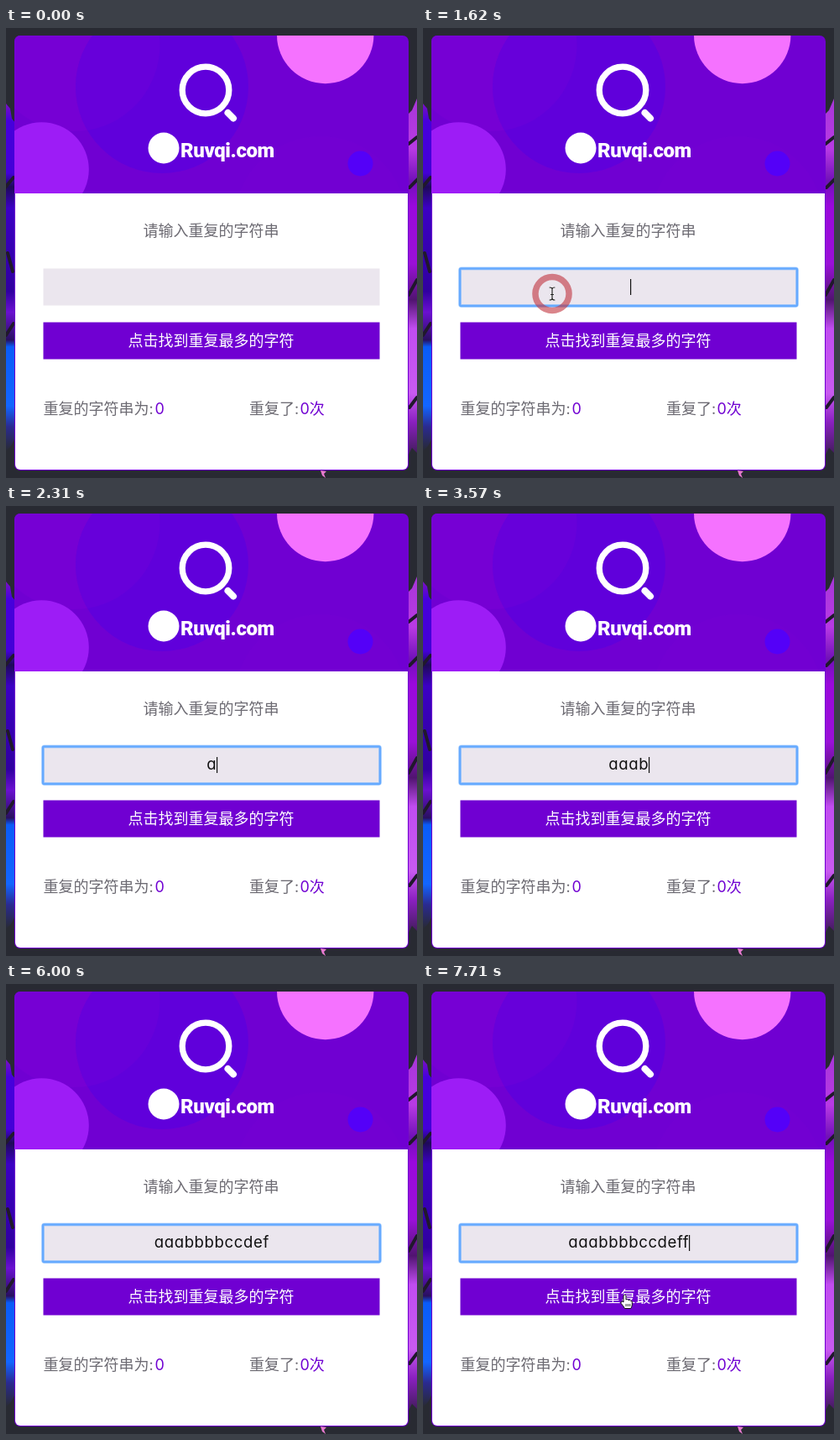
An HTML page for the animation above (8000 ms loop, 490 px wide and 536 px high).

```html
<!DOCTYPE html>
<html lang="zh">
<head>
<meta charset="utf-8">
<title>重复的字符</title>
<style>
html, body { margin: 0; width: 100%; height: 100%; overflow: hidden; background: #282a32; }
svg { display: block; width: 490px; height: 536px; }
text { font: 400 18px Inter, "Noto Sans CJK SC", "Noto Sans CJK", sans-serif; font-feature-settings: "cv11"; white-space: pre; }
.label { fill: #6c6a72; }
.value { fill: #7000d2; }
#button { font-weight: 500; fill: #fff; }
#typed { font-size: 18.6px; letter-spacing: .6px; fill: #111; }
#brand { font: 900 24px Roboto, sans-serif; letter-spacing: -.4px; fill: #fff; }
</style>
</head>
<body>
<svg viewBox="0 0 490 536">
  <defs>
    <clipPath id="head"><path d="M10 197V16a7 7 0 0 1 7-7H473a7 7 0 0 1 7 7V197Z"/></clipPath>
    <linearGradient id="left" x2="0" y2="1">
      <stop offset="0" stop-color="#7a10c4"/><stop offset=".05" stop-color="#4600dc"/>
      <stop offset=".2" stop-color="#4300d8"/><stop offset=".24" stop-color="#1e0a58"/>
      <stop offset=".3" stop-color="#3c00c4"/><stop offset=".54" stop-color="#3000a0"/>
      <stop offset=".6" stop-color="#6a10d0"/><stop offset=".68" stop-color="#281060"/>
      <stop offset=".7" stop-color="#0a5cf8"/><stop offset=".87" stop-color="#1266ff"/>
      <stop offset=".93" stop-color="#2a2a90"/><stop offset="1" stop-color="#282a32"/>
    </linearGradient>
    <linearGradient id="right" x2="0" y2="1">
      <stop offset="0" stop-color="#a836d8"/><stop offset=".14" stop-color="#b83ae4"/>
      <stop offset=".23" stop-color="#7010b8"/><stop offset=".3" stop-color="#9a08dc"/>
      <stop offset=".46" stop-color="#9a10d8"/><stop offset=".56" stop-color="#501470"/>
      <stop offset=".64" stop-color="#c04cf0"/><stop offset=".82" stop-color="#c85af0"/>
      <stop offset=".9" stop-color="#8a20c0"/><stop offset="1" stop-color="#3a1c50"/>
    </linearGradient>
  </defs>

  <rect width="490" height="536" fill="#282a32"/>
  <path d="M0 90 5 96 7 108 12 114V486L6 498 0 504Z" fill="url(#left)"/>
  <path d="M490 84 484 98 478 104V512L484 500 490 506Z" fill="url(#right)"/>
  <g fill="none" stroke="#20182c" stroke-width="4" stroke-linecap="round">
    <path d="M-1 190 9 178M2 268 8 290M0 366 9 352"/>
    <path d="M480 138 490 130M481 190 491 180M480 318 490 300M481 452 490 440"/>
  </g>
  <path d="M375 527 382 528 379 531 381 536 377 533Z" fill="#e87ad0"/>

  <rect x="10" y="9" width="470" height="518" rx="7" fill="#7000d2"/>
  <path d="M11 197H479V520a6 6 0 0 1-6 6H17a6 6 0 0 1-6-6Z" fill="#fff"/>
  <g clip-path="url(#head)">
    <circle cx="375" cy="232" r="103" fill="#7600d2" opacity=".4"/>
    <circle cx="80" cy="20" r="103" fill="#7600d4"/>
    <circle cx="186" cy="70" r="103" fill="#5800e0" opacity=".62"/>
    <path d="M83 70A103 103 0 0 1 102 11L183 9A103 103 0 0 1 97 122 103 103 0 0 1 83 70Z" fill="#7000d6" opacity=".3"/>
    <circle cx="42.500" cy="168.500" r="56.300" fill="#9d1cf6"/>
    <circle cx="380.700" cy="8.500" r="57.700" fill="#f572ff"/>
    <circle cx="422.500" cy="161.500" r="15" fill="#5400f8"/>
  </g>
  <g stroke="#fff" fill="none" stroke-linecap="round">
    <circle cx="238" cy="74" r="27.800" stroke-width="7.300"/>
    <path d="M264.500 101 271 107.500" stroke-width="8"/>
  </g>
  <circle cx="188" cy="143" r="18.500" fill="#fff"/>
  <text id="brand" x="208" y="154">Ruvqi.com</text>

  <text class="label" x="163.500" y="247.500">请输入重复的字符串</text>
  <rect x="44.500" y="286.500" width="401" height="44" fill="#ebe6ee"/>
  <g id="focus" fill="none" stroke="#66aaff">
    <rect x="44" y="286.500" width="402" height="44.500" rx="2" stroke-width="4" opacity=".45"/>
    <rect x="44" y="286.500" width="402" height="44.500" rx="1.500" stroke-width="2.400"/>
  </g>
  <text id="typed" x="245.300" y="314" text-anchor="middle"></text>
  <rect id="caret" y="299" width="1.200" height="19" fill="#111"/>
  <rect x="44.500" y="350.500" width="401" height="44" fill="#7000d2"/>
  <text id="button" x="145.500" y="378.800">点击找到重复最多的字符</text>
  <text class="label" x="44.500" y="459.500">重复的字符串为:<tspan class="value" x="177.500">0</tspan></text>
  <text class="label" x="290" y="459.500">重复了:<tspan class="value" x="350.500">0次</tspan></text>

  <circle id="ring" cx="154" cy="316.500" fill="none" stroke="#c0323c"/>
  <g id="pointer">
    <path id="arrow" d="M0 0V14.500L3.300 11.500 5.600 16.800 8.200 15.700 6 10.500H10.500Z" fill="#111" stroke="#fff"/>
    <g id="beam" fill="none" stroke-linecap="round">
      <path d="M-3-7.500Q0-7.500 0-5.500 0-7.500 3-7.500M0-5.500V5.500M-3 7.500Q0 7.500 0 5.500 0 7.500 3 7.500M-1.500 1H1.500" stroke="#fff" stroke-width="2.600" opacity=".55"/>
      <path d="M-3-7.500Q0-7.500 0-5.500 0-7.500 3-7.500M0-5.500V5.500M-3 7.500Q0 7.500 0 5.500 0 7.500 3 7.500M-1.500 1H1.500" stroke="#222" stroke-width="1.200"/>
    </g>
    <g id="hand" stroke="#111" stroke-linejoin="round">
      <path d="M-1.500 9V1.200Q0-1 1.500 1.200V6Q3.300 4.600 4.300 6.500 6 5.500 6.800 7.300 8.700 6.800 8.800 9V12Q8.500 14.500 7.300 16.500H0Q-1.500 13.500-4.300 10.500-5.200 8-3 8Z" fill="#fff"/>
      <path d="M1.600 11V14M3.900 11V14M6.200 11V14" stroke-width=".9"/>
    </g>
  </g>
</svg>
<script>
const LOOP = 8000, STEP = 30, BLINK = 450;
const PRESS = 1260, FOCUS = 1320, RELEASE = 1890;
const TEXT = "aaabbbbccdeff";
const KEYS = [2310, 2460, 2610, 3540, 3690, 3840, 3960, 4410, 4560, 5070, 5250, 5550, 6810];
// Pointer paths: [time, x, y]; each path ends when the pointer hides.
const PATHS = [
  { end: 2280, pts: [[720, 38, 227], [780, 115, 273], [930, 115, 273], [1110, 154, 316.5]] },
  { end: LOOP, pts: [[6150, 157, 317], [6390, 184, 331.5], [7240, 184, 331.5], [7680, 240.5, 370]] }
];

const $ = id => document.getElementById(id);
const show = (id, on) => $(id).setAttribute("visibility", on ? "visible" : "hidden");
const set = (id, attrs) => { for (const k in attrs) $(id).setAttribute(k, attrs[k]); };

function pointerAt(t) {
  const path = PATHS.find(p => t >= p.pts[0][0] && t < p.end);
  if (!path) return null;
  const { pts } = path;
  const i = pts.findIndex(p => p[0] > t);
  if (i < 0) return pts[pts.length - 1].slice(1);
  const [a, b] = [pts[i - 1], pts[i]];
  const k = (t - a[0]) / (b[0] - a[0]);
  return [a[1] + (b[1] - a[1]) * k, a[2] + (b[2] - a[2]) * k];
}

function drawPointer(t) {
  const pos = pointerAt(t);
  const kind = !pos ? "" : pos[1] > 350 ? "hand" : pos[1] > 287 && pos[1] < 331 ? "beam" : "arrow";
  for (const id of ["arrow", "beam", "hand"]) show(id, id === kind);
  if (pos) set("pointer", { transform: `translate(${pos})` });
}

function drawRing(t) {
  const on = t >= PRESS && t < RELEASE;
  show("ring", on);
  if (!on) return;
  const k = (t - PRESS) / 600;
  const outer = 4 + 40.5 * k ** 1.4;
  const width = Math.min(7.5, outer);
  set("ring", { r: outer - width / 2, "stroke-width": width, opacity: 0.85 - 0.43 * k });
}

function drawInput(t) {
  const count = KEYS.filter(k => k <= t).length;
  const last = count ? KEYS[count - 1] : PRESS;
  const field = $("typed");
  field.textContent = TEXT.slice(0, count);
  const x = count ? 245 + field.getComputedTextLength() / 2 : 247;
  set("caret", { x });
  show("focus", t >= FOCUS);
  show("caret", t >= FOCUS && Math.floor((t - last) / BLINK) % 2 === 0);
}

function frame() {
  const t = Math.floor((performance.now() % LOOP) / STEP) * STEP;
  drawInput(t);
  drawRing(t);
  drawPointer(t);
  requestAnimationFrame(frame);
}
frame();
</script>
</body>
</html>
```
